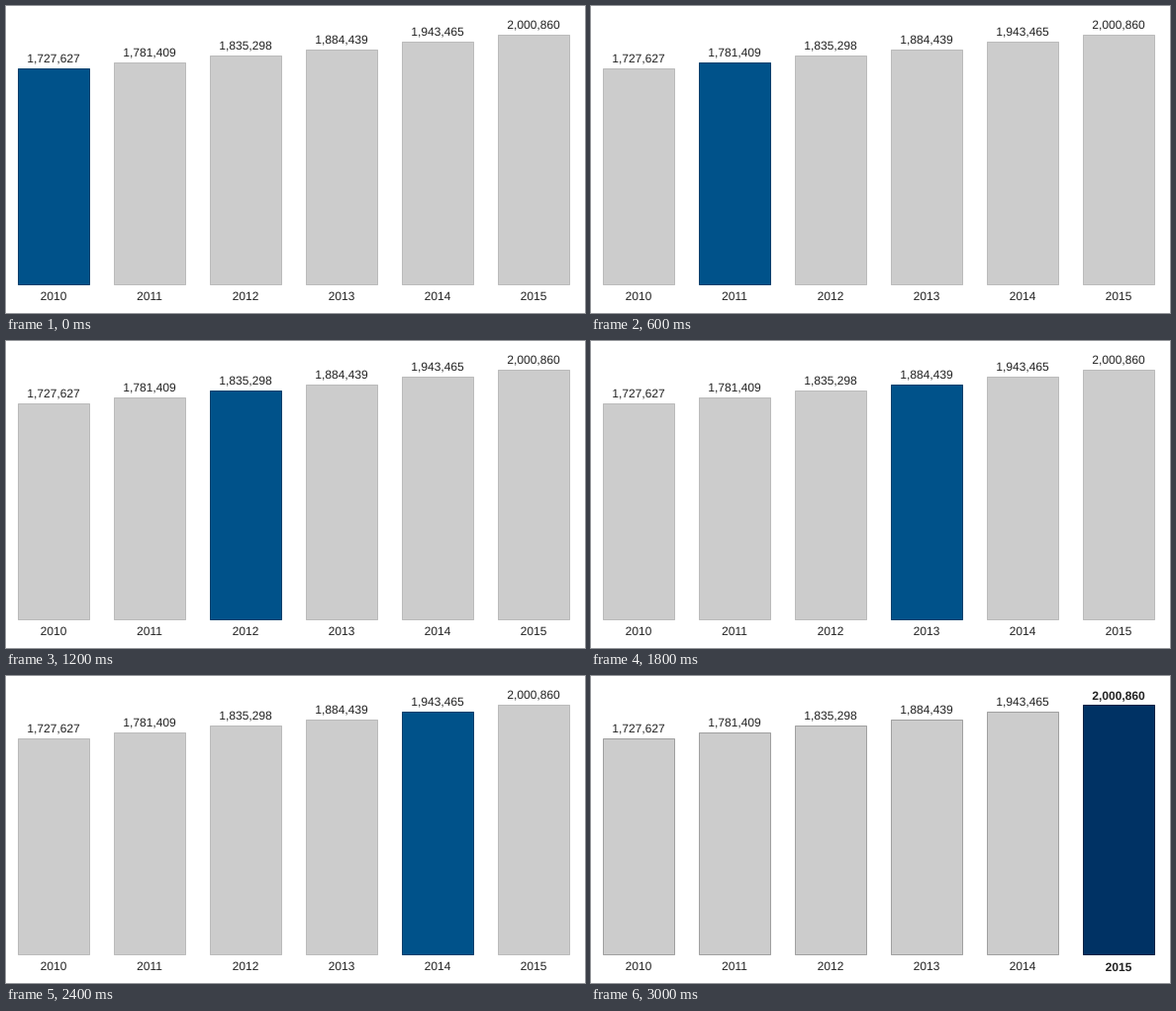
A matplotlib script that plays this animation: 585x310 px, repeating every 3600 ms.

```python
import matplotlib.pyplot as plt
from matplotlib.animation import FuncAnimation
from matplotlib.patches import Rectangle
from matplotlib.patheffects import Normal

W, H, DPI = 585, 310, 100
PX = 72 / DPI  # points per pixel

plt.rcParams["font.family"] = "Liberation Sans"
plt.rcParams["text.hinting"] = "none"

VALUES = [1727627, 1781409, 1835298, 1884439, 1943465, 2000860]
FIRST_YEAR = 2010
LEFT, STEP, BAR_W, BASE = 12, 97, 73, 282
SCALE = 253.2 / VALUES[-1]

GREY, BLUE, NAVY = "#cccccc", "#00528a", "#003264"
GREY_EDGE, GREY_EDGE_DARK = "#bbbbbb", "#a0a0a0"
BLUE_EDGE, NAVY_EDGE = "#00406c", "#002244"
INK = "#222222"

fig = plt.figure(figsize=(W / DPI, H / DPI), dpi=DPI, facecolor="white")
ax = fig.add_axes([0, 0, 1, 1])
ax.set_xlim(0, W)
ax.set_ylim(H, 0)
ax.axis("off")


def label(x, y, text):
    # The path effect draws outlines, which keeps exact baselines.
    return ax.text(x, y, text, ha="center", va="baseline", color=INK,
                   fontsize=12 * PX, path_effects=[Normal()])


bars, captions = [], []
for i, value in enumerate(VALUES):
    x = LEFT + i * STEP
    top = round(BASE - value * SCALE)
    bar = Rectangle((x + 0.5, top + 0.5), BAR_W - 1, BASE - top - 1,
                    linewidth=PX, joinstyle="miter", snap=False)
    bars.append(ax.add_patch(bar))
    mid = x + BAR_W // 2
    rows = [(top - 6, f"{value:,}"), (BASE + 15, str(FIRST_YEAR + i))]
    captions.append([(label(mid, y, text), y) for y, text in rows])


def draw(frame):
    last = frame == len(VALUES) - 1
    for i, (bar, texts) in enumerate(zip(bars, captions)):
        active = i == frame
        if active:
            fill, edge = (NAVY, NAVY_EDGE) if last else (BLUE, BLUE_EDGE)
        else:
            fill, edge = GREY, GREY_EDGE_DARK if last else GREY_EDGE
        bar.set_facecolor(fill)
        bar.set_edgecolor(edge)
        bold = active and last
        for text, y in texts:
            text.set_fontweight("bold" if bold else "normal")
            text.set_y(y + 1 if bold else y)  # bold sits a pixel lower
    return bars


anim = FuncAnimation(fig, draw, frames=len(VALUES), interval=600,
                     init_func=lambda: draw(0), repeat=True, repeat_delay=0)
plt.show()
```
